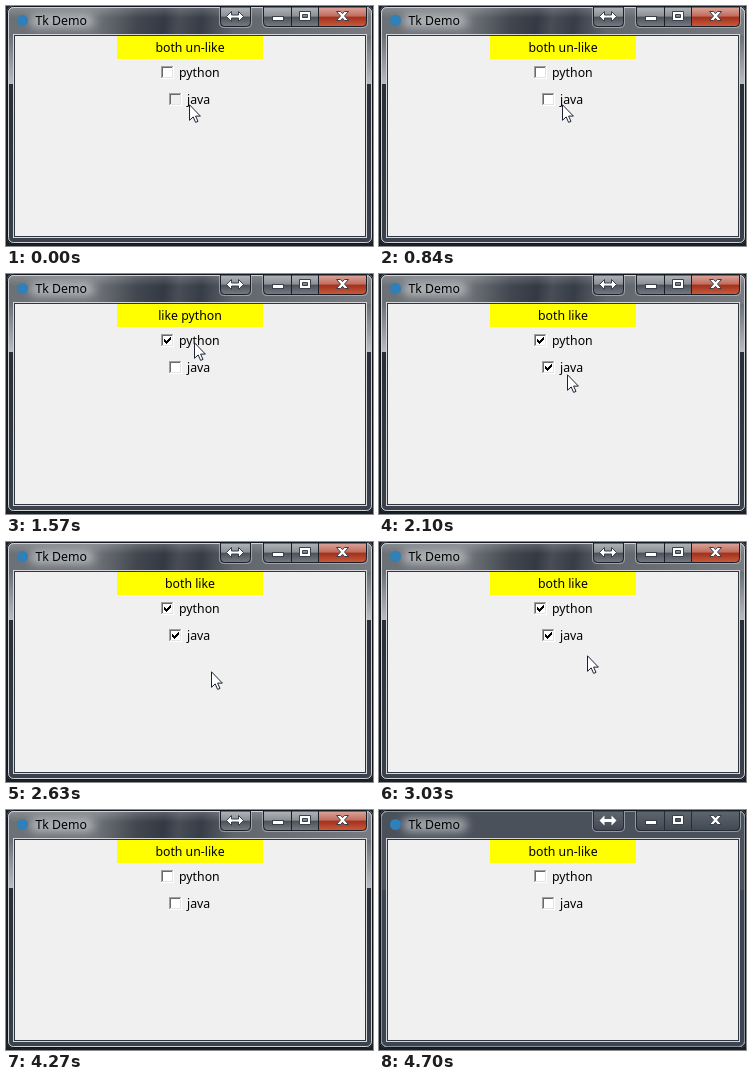
These frames come from a looping animation (367x240 px, 5260 ms). An HTML page:

```html
<!DOCTYPE html>
<html lang="en">
<head>
<meta charset="utf-8">
<title>Tk Demo</title>
<style>
  html, body { margin: 0; width: 100%; height: 100%; overflow: hidden; background: #1a202a; }
  svg { display: block; width: 367px; height: 240px; }
  text { font: 12.3px "Noto Sans", "Open Sans", sans-serif; fill: #000; }
  .status text { text-anchor: middle; }

  /* every change is a hard cut on one shared clock */
  .anim { animation: 5260ms step-end infinite; }
  .neither { animation-name: neither; }
  .java { animation-name: java; }
  .python { animation-name: python; }
  .both { animation-name: both; }
  .py-check { animation-name: py-check; }
  .java-check { animation-name: java-check; }
  .pressed { animation-name: pressed; }
  .inactive { animation-name: inactive; }
  .cursor { animation-name: cursor; }

  @keyframes neither {
    0%, 15.969%, 76.045%, 100% { opacity: 1; }
    2.281%, 29.847% { opacity: 0; }
  }
  @keyframes java {
    0%, 15.969%, 100% { opacity: 0; }
    2.281% { opacity: 1; }
  }
  @keyframes python {
    0%, 39.923%, 76.045%, 100% { opacity: 0; }
    29.847%, 65.019% { opacity: 1; }
  }
  @keyframes both {
    0%, 65.019%, 100% { opacity: 0; }
    39.923% { opacity: 1; }
  }
  @keyframes py-check {
    0%, 76.045%, 100% { opacity: 0; }
    29.847% { opacity: 1; }
  }
  @keyframes java-check {
    0%, 15.969%, 65.019%, 100% { opacity: 0; }
    2.281%, 39.923% { opacity: 1; }
  }
  @keyframes pressed {
    0%, 100% { opacity: 1; }
    2.281% { opacity: 0; }
  }
  @keyframes inactive {
    0%, 100% { opacity: 0; }
    89.353% { opacity: 1; }
  }
  @keyframes cursor {
    0% { transform: translate(183px, 98px); opacity: 1; }
    18.821% { transform: translate(183px, 91px); opacity: 1; }
    21.863% { transform: translate(187px, 77px); opacity: 1; }
    24.714% { transform: translate(188px, 68px); opacity: 1; }
    32.699% { transform: translate(188px, 86px); opacity: 1; }
    34.980% { transform: translate(188px, 100px); opacity: 1; }
    50% { transform: translate(205px, 129px); opacity: 1; }
    52.471% { transform: translate(229px, 170px); opacity: 1; }
    55.323% { transform: translate(221px, 143px); opacity: 1; }
    57.604% { transform: translate(208px, 113px); opacity: 1; }
    60.456% { transform: translate(194px, 83px); opacity: 1; }
    67.870% { transform: translate(194px, 79px); opacity: 1; }
    70.912% { transform: translate(199px, 69px); opacity: 1; }
    78.897% { transform: translate(261px, 180px); opacity: 1; }
    81.178%, 100% { transform: translate(261px, 180px); opacity: 0; }
  }
</style>
</head>
<body>
<svg viewBox="0 0 367 240">
  <defs>
    <linearGradient id="bar" gradientUnits="userSpaceOnUse" x1="0" y1="0" x2="367" y2="40">
      <stop offset="0" stop-color="#6c7177"/>
      <stop offset=".25" stop-color="#6f7378"/>
      <stop offset=".36" stop-color="#41464f"/>
      <stop offset=".43" stop-color="#343a44"/>
      <stop offset=".47" stop-color="#484d56"/>
      <stop offset=".53" stop-color="#373d47"/>
      <stop offset=".62" stop-color="#61666d"/>
      <stop offset="1" stop-color="#787c82"/>
    </linearGradient>
    <linearGradient id="shine" x2="0" y2="1">
      <stop offset="0" stop-color="#fff" stop-opacity=".22"/>
      <stop offset=".4" stop-color="#fff" stop-opacity="0"/>
    </linearGradient>
    <linearGradient id="side" x2="0" y2="1">
      <stop offset="0" stop-color="#6b7076"/>
      <stop offset="1" stop-color="#b9bcc0"/>
    </linearGradient>
    <linearGradient id="low" x2="0" y2="1">
      <stop offset="0" stop-color="#20252d"/>
      <stop offset="1" stop-color="#3c424b"/>
    </linearGradient>
    <linearGradient id="glass" x2="0" y2="1">
      <stop offset="0" stop-color="#b2b5b9"/>
      <stop offset=".48" stop-color="#8b8f95"/>
      <stop offset=".5" stop-color="#4b5058"/>
      <stop offset="1" stop-color="#777c83"/>
    </linearGradient>
    <linearGradient id="red" x2="0" y2="1">
      <stop offset="0" stop-color="#dca79c"/>
      <stop offset=".48" stop-color="#c06b5d"/>
      <stop offset=".5" stop-color="#a02f1c"/>
      <stop offset="1" stop-color="#cb5a3c"/>
    </linearGradient>
    <linearGradient id="dim" x2="0" y2="1">
      <stop offset="0" stop-color="#5f666f"/>
      <stop offset="1" stop-color="#414852"/>
    </linearGradient>
    <filter id="blur" x="-40%" y="-120%" width="180%" height="340%">
      <feGaussianBlur stdDeviation="5"/>
    </filter>
    <clipPath id="shape"><rect x="1" width="366" height="238" rx="6"/></clipPath>

    <path id="resize" d="M214.500 1V16.500Q214.500 20.500 218.500 20.500H240.500Q244.500 20.500 244.500 16.500V1Z"/>
    <path id="mini" d="M257.500 1V16.500Q257.500 20.500 261.500 20.500H312.500V1Z"/>
    <path id="close" d="M312.500 1V20.500H356.500Q360.500 20.500 360.500 16.500V1Z"/>
    <path id="arrows" d="M220.500 10.500L225.500 5.500V9H232.500V5.500L237.500 10.500L232.500 15.500V12H225.500V15.500Z"/>
    <g id="marks" stroke="#39404a" fill="#fff">
      <rect x="266.500" y="10.500" width="11" height="4"/>
      <path fill-rule="evenodd" d="M293.500 5.500H304.500V14.500H293.500ZM296.500 8.500V11.500H301.500V8.500Z"/>
      <path d="M330.500 5.500H334.500L336.500 7.700L338.500 5.500H342.500L338.500 10L342.500 14.500H338.500L336.500 12.300L334.500 14.500H330.500L334.500 10Z"/>
    </g>
    <g id="box">
      <path fill="#fff" d="M0 0H13V13H0Z"/>
      <path fill="#a0a0a0" d="M0 0H12V1H1V12H0Z"/>
      <path fill="#696969" d="M1 1H11V2H2V11H1Z"/>
      <path fill="#e3e3e3" d="M11 1H12V12H1V11H11Z"/>
    </g>
    <path id="tick" d="M3 5h1v1h1v1h1v-1h1v-1h1v-1h1v-1h1v3h-1v1h-1v1h-1v1h-1v1h-1v-1h-1v-1h-1z"/>
  </defs>

  <rect width="367" height="240" fill="#1a202a"/>

  <g clip-path="url(#shape)">
    <rect width="367" height="240" fill="url(#low)"/>
    <rect width="367" height="30" fill="url(#bar)"/>
    <rect width="367" height="30" fill="url(#shine)"/>
    <rect y="30" width="367" height="48" fill="url(#side)"/>
    <rect y="231" width="367" height="9" fill="#3c424b"/>
    <g class="anim inactive">
      <rect width="367" height="240" fill="#4a515b"/>
      <rect y="80" width="367" height="160" fill="#3d4550"/>
    </g>
    <rect x="24" y="8" width="64" height="14" rx="6" fill="#e2e4e6" opacity=".6" filter="url(#blur)"/>
  </g>
  <rect x="1.500" y=".5" width="365" height="237" rx="6" fill="none" stroke="#11161e"/>
  <rect x="2.500" y="1.500" width="363" height="235" rx="5" fill="none" stroke="#cfd2d5"/>
  <rect class="anim inactive" x="2.500" y="1.500" width="363" height="235" rx="5" fill="none" stroke="#8b929a"/>

  <g stroke="#1b2028">
    <use href="#resize" fill="url(#glass)"/>
    <use href="#mini" fill="url(#glass)"/>
    <use href="#close" fill="url(#red)"/>
    <path d="M285.500 1V20"/>
  </g>
  <use href="#arrows" fill="#fff" stroke="#39404a"/>
  <g class="anim inactive" stroke="#252c35" fill="url(#dim)">
    <use href="#resize"/>
    <use href="#mini"/>
    <use href="#close"/>
    <path d="M285.500 1V20"/>
    <use href="#arrows" fill="#fff" stroke="none"/>
  </g>
  <g fill="none" stroke="#c3c8ce" stroke-opacity=".6">
    <path d="M213.500 2V17Q213.500 21.500 218 21.500H241Q245.500 21.500 245.500 17V2"/>
    <path d="M256.500 2V17Q256.500 21.500 261 21.500H357Q361.500 21.500 361.500 17V2"/>
  </g>
  <use href="#marks"/>

  <circle cx="16.500" cy="14.500" r="5.500" fill="#2f7fb8"/>
  <text x="29.500" y="19">Tk Demo</text>

  <rect x="7.500" y="28.500" width="353" height="203" fill="none" stroke="#d4d6d9"/>
  <rect x="8.500" y="29.500" width="351" height="201" fill="#f0f0f0" stroke="#30363f"/>

  <rect x="111" y="30" width="146" height="23" fill="#ff0"/>
  <g class="status">
    <text class="anim neither" x="184" y="46">both un-like</text>
    <text class="anim java" x="184" y="46">like java</text>
    <text class="anim python" x="184" y="46">like python</text>
    <text class="anim both" x="184" y="46">both like</text>
  </g>

  <g transform="translate(155 60)">
    <use href="#box"/>
    <use class="anim py-check" href="#tick"/>
    <text x="18" y="11">python</text>
  </g>
  <g transform="translate(163 87)">
    <use href="#box"/>
    <rect class="anim pressed" x="2" y="2" width="9" height="9" fill="#f0f0f0"/>
    <use class="anim java-check" href="#tick"/>
    <text x="18" y="11">java</text>
  </g>

  <path class="anim cursor" fill="#fff" stroke="#1c2233"
    d="M.5 .8V16.300L4.200 12.900L6.600 18.400L9 17.400L6.600 12.100H11.400Z"/>
</svg>
</body>
</html>
```
